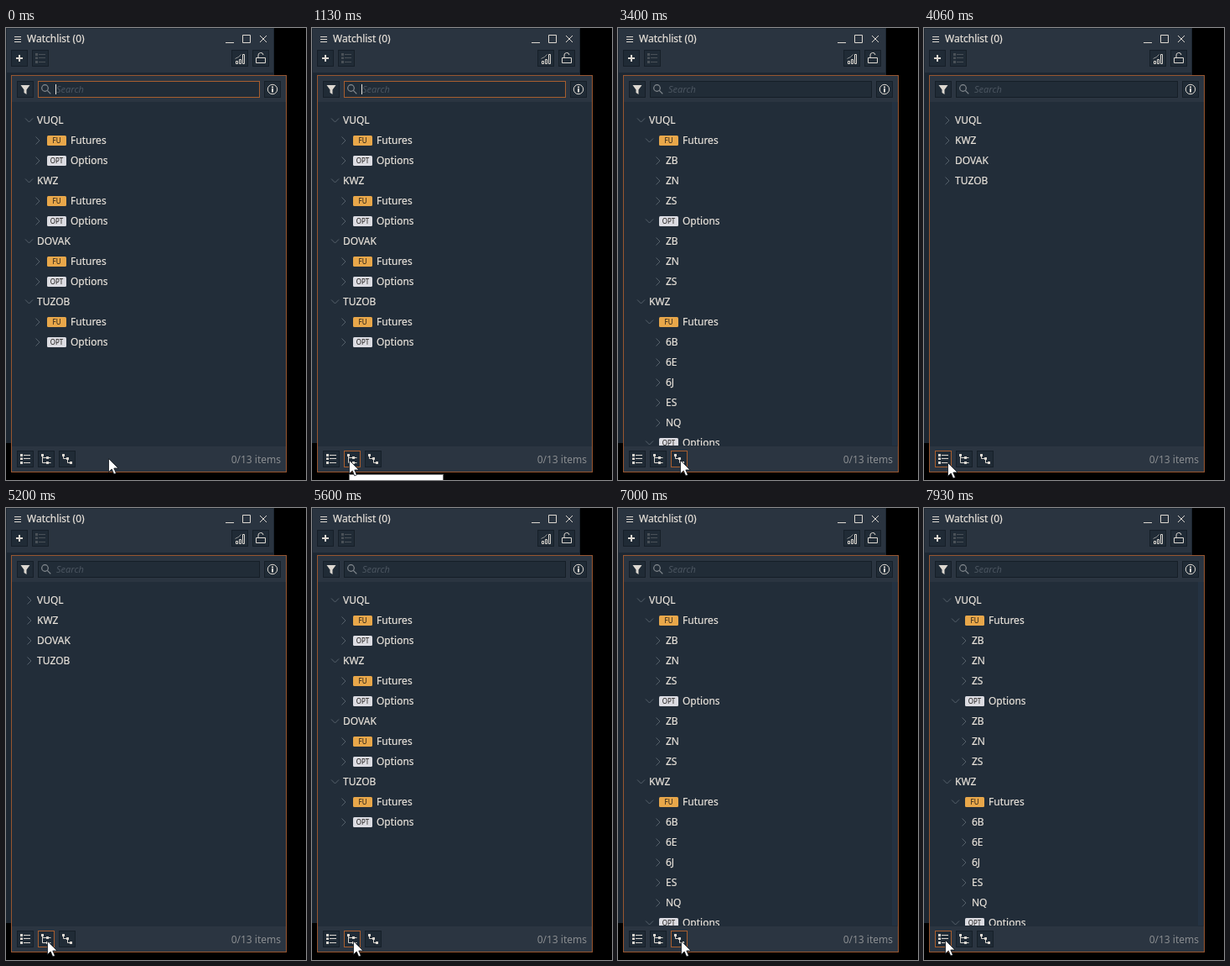
Animation of 358 by 538 pixels, one loop 8000 ms. Source, as an HTML page:

```html
<!DOCTYPE html>
<html lang="en">
<head>
<meta charset="utf-8">
<title>Watchlist</title>
<style>
html, body { margin: 0; width: 100%; height: 100%; overflow: hidden; background: #000; }
svg { display: block; }
text { font: 12px "Noto Sans", "Open Sans", sans-serif; fill: #e8e2da; white-space: pre; }
.label { stroke: #e8e2da; stroke-width: .2; }
.line { fill: none; stroke: #ddd8d1; stroke-width: 1; }
.solid { fill: #ddd8d1; }
.btn { fill: #202b36; stroke: #161f28; }
.dim { opacity: .22; }
.chev { fill: none; stroke: #56616b; stroke-width: 1; }
.badge { font-size: 8px; font-weight: 500; fill: #1c1a18; text-anchor: middle; }
.hint { font-size: 11px; font-style: italic; fill: #4b5560; }
.count { fill: #8a8d90; text-anchor: end; }
.hot { fill: none; stroke: #a85e2e; }

#cursor { animation: cursor 8s ease-in-out infinite; }
#brief, #mid, #full, #focus, #caret, #tipA, #hot0, #hot1, #hot2 { animation: 8s step-end infinite; }
#brief { animation-name: brief; }
#mid { animation-name: mid; }
#full { animation-name: full; }
#focus { animation-name: focus; }
#caret { animation-name: caret; }
#tipA { animation-name: tipA; }
#tipB { animation: tipB 8s linear infinite; }
#hot0 { animation-name: hot0; }
#hot1 { animation-name: hot1; }
#hot2 { animation-name: hot2; }

@keyframes cursor {
  0%, .75% { transform: translate(122px, 512px); }
  9.1%, 20% { transform: translate(44px, 514px); }
  28.2%, 42.5% { transform: translate(74px, 514px); }
  48.2%, 50.8% { transform: translate(28px, 517px); }
  65%, 75.8% { transform: translate(49px, 515px); animation-timing-function: ease-in; }
  78.2% { transform: translate(66px, 514px); animation-timing-function: ease-out; }
  80.75%, 93.2% { transform: translate(75px, 515px); }
  99%, 100% { transform: translate(25px, 514px); }
}
@keyframes mid {
  0%, 69.1% { visibility: visible; }
  31.6%, 82.5%, 100% { visibility: hidden; }
}
@keyframes full {
  0%, 50.7% { visibility: hidden; }
  31.6%, 82.5%, 100% { visibility: visible; }
}
@keyframes brief {
  0%, 69.1%, 100% { visibility: hidden; }
  50.7% { visibility: visible; }
}
@keyframes focus {
  0% { visibility: visible; }
  16.6%, 100% { visibility: hidden; }
}
@keyframes caret {
  0%, 14.1% { visibility: visible; }
  7.5%, 16.6%, 100% { visibility: hidden; }
}
@keyframes tipA {
  0%, 16.6%, 100% { visibility: hidden; }
  14.1% { visibility: visible; }
}
@keyframes tipB {
  0%, 75.6% { opacity: 0; }
  75.7%, 76.6% { opacity: 1; }
  78.2% { opacity: .06; }
  78.8%, 100% { opacity: 0; }
}
@keyframes hot0 {
  0%, 55.6% { visibility: hidden; }
  47.5%, 97.4%, 100% { visibility: visible; }
}
@keyframes hot1 {
  0%, 23.9%, 46.7%, 76.9%, 96.8%, 100% { visibility: hidden; }
  6.9%, 45%, 57.8%, 95% { visibility: visible; }
}
@keyframes hot2 {
  0%, 44.4%, 94.6%, 100% { visibility: hidden; }
  25%, 79.1% { visibility: visible; }
}
</style>
</head>
<body>
<svg width="358" height="538" viewBox="0 0 358 538">
  <defs>
    <clipPath id="view"><rect x="7" y="88" width="327" height="409"/></clipPath>
    <g id="list">
      <path class="line" d="M8 5.5h8M8 9.5h8M8 14.5h8"/>
      <path class="solid" d="M4 4h3v3H4zM4 8.500h3v2.500H4zM4 13h3v3H4z"/>
    </g>
  </defs>

  <!-- window -->
  <rect width="320" height="494" fill="#1d2732"/>
  <rect x="1" y="1" width="318" height="52" fill="#2a3440"/>
  <path class="line" d="M10 10.5h8M10 13.5h8M10 16.5h8"/>
  <text class="label" x="25" y="17">Watchlist (0)</text>
  <path class="line" d="M262 17.5h10M282.5 8.5h9v9h-9zM303 9l8 8M311 9l-8 8"/>
  <g id="tools"></g>
  <path class="line" style="stroke-width:2" d="M12 36h8M16 32v8"/>
  <use href="#list" x="31" y="26" class="dim"/>
  <path class="line" d="M274.5 42.5v-3h2v3zM278.500 42.500v-5h2v5zM282.500 42.500v-11h2v11z"/>
  <path class="line" opacity=".6" d="M273.500 36.500l4-2 3-3"/>
  <path class="line" d="M298.500 35.500h11v6h-11zM301 35v-2a3 3 0 0 1 6-1"/>

  <!-- panel -->
  <rect x="6.5" y="56.5" width="328" height="472" fill="#2b3541" stroke="#985630"/>
  <rect x="7" y="88" width="327" height="410" fill="#222d39"/>
  <g id="bar"></g>
  <path class="solid" d="M17.500 68h11l-4 5.500v5.500l-3-2v-3.500z"/>
  <rect x="38.500" y="63.500" width="264" height="19" fill="#212c37" stroke="#151e27"/>
  <rect id="focus" class="hot" x="38.500" y="63.500" width="264" height="19"/>
  <g fill="none" stroke="#858b90" stroke-width="1.200">
    <circle cx="46.500" cy="71.500" r="3.800"/><path d="M49.300 74.300l4 4"/>
  </g>
  <text class="hint" x="60" y="77">Search</text>
  <path id="caret" d="M59.500 67v12" stroke="#e6e2dc"/>
  <circle class="line" cx="318" cy="73" r="5.700"/>
  <path class="solid" d="M317 69.500h2v1.700h-2zM317 72h2v4.500h-2z"/>

  <g clip-path="url(#view)">
    <g id="mid"></g><g id="full"></g><g id="brief"></g>
  </g>

  <use href="#list" x="13" y="503"/>
  <g transform="translate(38 503)">
    <path class="line" d="M5.500 5v9.500h5M5.500 8.500h5M13 8.500h2.500M13 14.500h2.500"/>
    <path class="solid" d="M4 4h3v3H4zM10 7h3v3h-3zM10 13h3v3h-3z"/>
  </g>
  <g transform="translate(63 503)">
    <path class="line" d="M5.500 5v4.500h5v5h4"/>
    <path class="solid" d="M4 4h3v3H4zM9 8h3v3H9zM13 13h3v3h-3z"/>
  </g>
  <g id="hots"></g>
  <text class="count" x="328" y="518">0/13 items</text>

  <rect id="tipA" x="44.500" y="531.500" width="112" height="20" fill="#fff" stroke="#777"/>
  <rect id="tipB" x="49.500" y="533.500" width="111" height="20" fill="#fff" stroke="#777"/>
  <path id="cursor" d="M.5 .5v16l3.700-3.500 2.600 6 2.600-1.100-2.600-5.900h5.200z" fill="#fff" stroke="#10151b" stroke-width=".8"/>
</svg>
<script>
const $ = id => document.getElementById(id);
const box = (x, y, cls, id = '') =>
  `<rect ${id && `id="${id}"`} class="${cls}" x="${x + .5}" y="${y + .5}" width="19" height="19"/>`;

$('tools').innerHTML = [6, 31, 269, 294].map(x => box(x, 26, 'btn')).join('');
$('bar').innerHTML = [13, 308].map(x => box(x, 63, 'btn')).join('') +
  [13, 38, 63].map(x => box(x, 503, 'btn')).join('');
$('hots').innerHTML = [13, 38, 63].map((x, i) => box(x, 503, 'hot', 'hot' + i)).join('');

const markets = [
  ['VUQL', 'ZB ZN ZS'],
  ['KWZ', '6B 6E 6J ES NQ'],
  ['DOVAK', ''],
  ['TUZOB', '']
];
const kinds = [['Futures', 'FU', '#e8a74a'], ['Options', 'OPT', '#dcdce2']];
const scrollTrack = '<rect x="327" y="88" width="6" height="409" fill="#243242"/>';

function tree(depth) {
  let y = 110, out = depth > 1 ? scrollTrack : '';
  const row = (level, label, open, tag, color) => {
    const x = 27.5 + level * 10;
    out += `<path class="chev" d="${open
      ? `M${x - 4.5} ${y - 2.5}l4.500 4.500 4.500-4.500`
      : `M${x - 2} ${y - 4.5}l4.500 4.500-4.500 4.500`}"/>`;
    if (tag) out += `<rect x="49" y="${y - 6}" width="23" height="12" rx="1.500" fill="${color}"/>` +
      `<text class="badge" x="60.500" y="${y + 3}">${tag}</text>`;
    out += `<text class="label" x="${tag ? 77 : x + 9.5}" y="${y + 4}">${label}</text>`;
    y += 24;
  };
  for (const [name, codes] of markets) {
    if (y > 500) break;
    row(0, name, depth > 0);
    if (!depth) continue;
    for (const [label, tag, color] of kinds) {
      row(1, label, depth > 1, tag, color);
      if (depth > 1 && codes) codes.split(' ').forEach(code => row(2, code, false));
    }
  }
  return out;
}
['brief', 'mid', 'full'].forEach((id, depth) => { $(id).innerHTML = tree(depth); });
</script>
</body>
</html>
```
